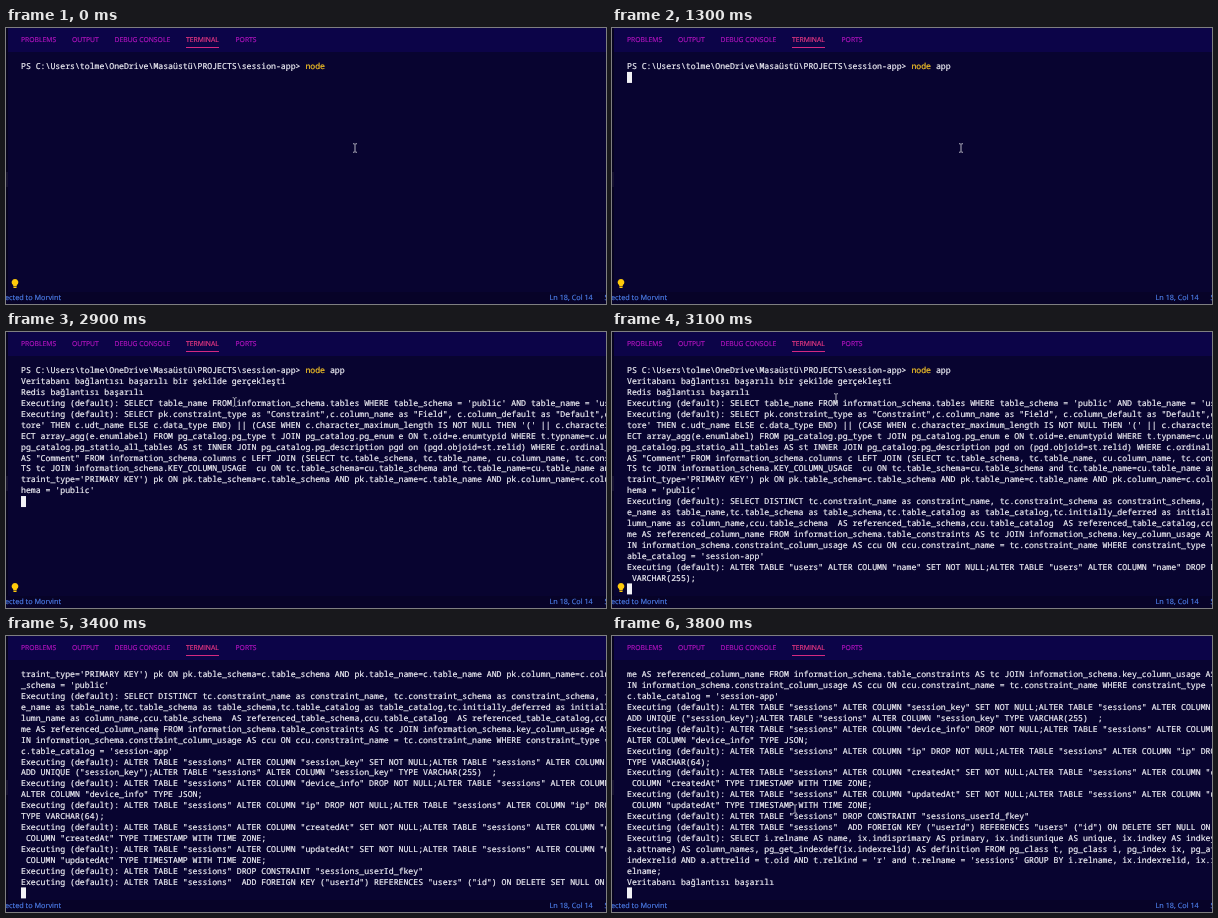
These frames come from a looping animation (600x276 px, 3900 ms). An HTML page:

```html
<!DOCTYPE html>
<html lang="tr">
<head>
<meta charset="utf-8">
<title>Terminal</title>
<style>
  html, body { margin: 0; width: 100%; height: 100%; overflow: hidden; background: #080430; }
  #stage {
    position: relative; width: 600px; height: 276px; overflow: hidden;
    background: #080430; text-rendering: geometricPrecision;
  }
  #stage > * { position: absolute; }
  .ui { font-family: "Open Sans", "Noto Sans", sans-serif; white-space: pre; -webkit-text-stroke: .15px; }
  #tabs { left: 0; top: 0; width: 600px; height: 24px; background: #0c0448; }
  #tabs span { position: absolute; top: 6px; font-size: 6.8px; line-height: 12px; color: #b414c0; }
  #tabs .on { color: #f43a86; }
  #tabs .on::after {
    content: ""; position: absolute; left: 0; right: 0; top: 13px; height: 1px; background: #d42a80;
  }
  #edge { left: 0; top: 0; width: 1.5px; height: 264px; background: #06031f; }
  #grip { left: 0; top: 144px; width: 1.5px; height: 15px; background: #15112f; }
  #status { left: 0; top: 264px; width: 600px; height: 12px; background: #070328; }
  #status span { position: absolute; top: 0; font-size: 7.3px; line-height: 13px; color: #4f82f0; }
  #log {
    margin: 0; left: 15px; top: 34.2px; width: 640px;
    font: 8.19px/10.92px "Noto Sans Mono", "DejaVu Sans Mono", monospace;
    color: #f2f2f8; -webkit-text-stroke: .2px;
  }
  #log b { font-weight: inherit; color: #f9c626; }
  #cursor { left: 15px; top: 33.4px; width: 5px; height: 10.5px; background: #f2f2f6; }
  #bulb { left: 4px; top: 250px; }
  #mouse { left: -4px; top: -5px; }
</style>
</head>
<body>
<div id="stage">
  <div id="tabs" class="ui">
    <span style="left:15px">PROBLEMS</span>
    <span style="left:66px">OUTPUT</span>
    <span style="left:108.5px">DEBUG CONSOLE</span>
    <span class="on" style="left:180px">TERMINAL</span>
    <span style="left:229.5px">PORTS</span>
  </div>
  <div id="edge"></div>
  <div id="grip"></div>
  <pre id="log"></pre>
  <div id="cursor"></div>
  <svg id="bulb" width="10" height="12" viewBox="0 0 11 13">
    <path d="M5.5 1a3.6 3.6 0 0 0-2 6.6V9h4V7.6A3.6 3.6 0 0 0 5.5 1zM3.8 9.6h3.4v1.4H3.8z" fill="#ffcb0a"/>
  </svg>
  <div id="status" class="ui">
    <span style="left:-1px">ected to Morvint</span>
    <span style="left:543.5px">Ln 18, Col 14</span>
    <span style="left:598.5px">Spaces: 4</span>
  </div>
  <svg id="mouse" width="8" height="10">
    <path d="M2 .7Q3.6.7 4 1.5Q4.4.7 6 .7M4 1.5V8.5M2 9.3Q3.6 9.3 4 8.5Q4.4 9.3 6 9.3"
      fill="none" stroke="#c9c9d2" stroke-width=".9"/>
  </svg>
</div>
<script>
const LOOP = 3900, STEP = 100, ROWS = 20, LINE = 10.92, CHAR = 4.914;
const PROMPT = "PS C:\\Users\\tolme\\OneDrive\\Masaüstü\\PROJECTS\\session-app> ";
const EXEC = "Executing (default): ";
const $ = id => document.getElementById(id);

const schema = (table, end, catalog) => [
  EXEC + `SELECT table_name FROM information_schema.tables WHERE table_schema = 'public' AND table_name = '${table}'`,
  EXEC + `SELECT pk.constraint_type as "Constraint",c.column_name as "Field", c.column_default as "Default",c.is`,
  `tore' THEN c.udt_name ELSE c.data_type END) || (CASE WHEN c.character_maximum_length IS NOT NULL THEN '(' || c.character_`,
  `ECT array_agg(e.enumlabel) FROM pg_catalog.pg_type t JOIN pg_catalog.pg_enum e ON t.oid=e.enumtypid WHERE t.typname=c.udt`,
  `pg_catalog.pg_statio_all_tables AS st INNER JOIN pg_catalog.pg_description pgd on (pgd.objoid=st.relid) WHERE c.ordinal_po`,
  `AS "Comment" FROM information_schema.columns c LEFT JOIN (SELECT tc.table_schema, tc.table_name, cu.column_name, tc.const`,
  `TS tc JOIN information_schema.KEY_COLUMN_USAGE  cu ON tc.table_schema=cu.table_schema and tc.table_name=cu.table_name and`,
  `traint_type='PRIMARY KEY') pk ON pk.table_schema=c.table_schema AND pk.table_name=c.table_name AND pk.column_name=c.colum`,
  `${end} = 'public'`,
  EXEC + `SELECT DISTINCT tc.constraint_name as constraint_name, tc.constraint_schema as constraint_schema, tc.`,
  `e_name as table_name,tc.table_schema as table_schema,tc.table_catalog as table_catalog,tc.initially_deferred as initially`,
  `lumn_name as column_name,ccu.table_schema  AS referenced_table_schema,ccu.table_catalog  AS referenced_table_catalog,ccu.`,
  `me AS referenced_column_name FROM information_schema.table_constraints AS tc JOIN information_schema.key_column_usage AS `,
  `IN information_schema.constraint_column_usage AS ccu ON ccu.constraint_name = tc.constraint_name WHERE constraint_type = '`,
  `${catalog} = 'session-app'`
];

const alter = (table, column, rule, rest) => {
  const head = `ALTER TABLE "${table}" ALTER COLUMN "${column}" `;
  return [EXEC + head + rule + " NOT NULL;" + head + "DROP DEFAULT;", rest];
};

const stamp = (table, column) =>
  alter(table, column, "SET", ` COLUMN "${column}" TYPE TIMESTAMP WITH TIME ZONE;`);

const indexes = (table, end) => [
  EXEC + "SELECT i.relname AS name, ix.indisprimary AS primary, ix.indisunique AS unique, ix.indkey AS indkey, ",
  "a.attname) AS column_names, pg_get_indexdef(ix.indexrelid) AS definition FROM pg_class t, pg_class i, pg_index ix, pg_att",
  `indexrelid AND a.attrelid = t.oid AND t.relkind = 'r' and t.relname = '${table}' GROUP BY i.relname, ix.indexrelid, ix.in`,
  end
];

const lines = [
  PROMPT,
  "Veritabanı bağlantısı başarılı bir şekilde gerçekleşti",
  "Redis bağlantısı başarılı",
  ...schema("users", "hema", "able_catalog"),
  ...alter("users", "name", "SET", " VARCHAR(255);"),
  ...alter("users", "email", "SET", "E VARCHAR(255);"),
  ...alter("users", "password", "SET", "sword\" TYPE VARCHAR(255);"),
  ...stamp("users", "createdAt"),
  ...stamp("users", "updatedAt"),
  ...indexes("users", "ame;"),
  ...schema("sessions", "_schema", "c.table_catalog"),
  ...alter("sessions", "session_key", "SET",
    `ADD UNIQUE ("session_key");ALTER TABLE "sessions" ALTER COLUMN "session_key" TYPE VARCHAR(255)  ;`),
  ...alter("sessions", "device_info", "DROP", `ALTER COLUMN "device_info" TYPE JSON;`),
  ...alter("sessions", "ip", "DROP", "TYPE VARCHAR(64);"),
  ...stamp("sessions", "createdAt"),
  ...stamp("sessions", "updatedAt"),
  EXEC + `ALTER TABLE "sessions" DROP CONSTRAINT "sessions_userId_fkey"`,
  EXEC + `ALTER TABLE "sessions"  ADD FOREIGN KEY ("userId") REFERENCES "users" ("id") ON DELETE SET NULL ON UPDATE`,
  ...indexes("sessions", "elname;"),
  "Veritabanı bağlantısı başarılı"
];

// [time, value]: the value holds until the next entry
const typed = [[0, ""], [100, " "], [300, " a"], [400, " ap"], [600, " app"]];
const printed = [[0, 1], [2600, 2], [2700, 3], [2800, 4], [2900, 12], [3000, 18],
  [3100, 20], [3200, 36], [3300, 51], [3400, 59], [3500, 63], [3800, 64]];
// [time, x, y]: the pointer glides between entries
const path = [[0, 349, 120], [2000, 349, 120], [2100, 332, 113], [2200, 290, 96], [2300, 254, 83],
  [2400, 238, 78], [2500, 238, 78], [3100, 224, 66], [3200, 201, 69], [3300, 172, 77],
  [3400, 151, 98], [3500, 151, 122], [3600, 161, 146], [3700, 175, 165], [3800, 183, 173]];

const held = (list, t) => list.filter(e => e[0] <= t).pop();

function pointer(t) {
  const a = held(path, t), b = path[path.indexOf(a) + 1] || a;
  const k = a === b ? 0 : (t - a[0]) / (b[0] - a[0]);
  return [a[1] + (b[1] - a[1]) * k, a[2] + (b[2] - a[2]) * k];
}

const command = document.createElement("b");
command.textContent = "node";

function draw(t) {
  const input = held(typed, t)[1], count = held(printed, t)[1];
  const first = Math.max(0, count - ROWS);
  const shown = lines.slice(Math.max(1, first), count).join("\n");
  if (first) $("log").replaceChildren(shown);
  else $("log").replaceChildren(PROMPT, command, input + "\n" + shown);

  const entered = t >= 1300;
  const col = entered ? 0 : PROMPT.length + 4 + input.length;
  const row = entered ? count - first : 0;
  $("cursor").style.transform = `translate(${col * CHAR}px, ${row * LINE}px)`;
  $("cursor").style.visibility = t < 700 ? "hidden" : "visible";

  const [x, y] = pointer(t);
  $("mouse").style.transform = `translate(${x}px, ${y}px)`;
  $("bulb").style.visibility = t < 3200 ? "visible" : "hidden";
}

const start = performance.now();
let last = -1;
function tick() {
  const t = Math.floor((performance.now() - start) % LOOP / STEP) * STEP;
  if (t !== last) draw(last = t);
  requestAnimationFrame(tick);
}
tick();
</script>
</body>
</html>
```
